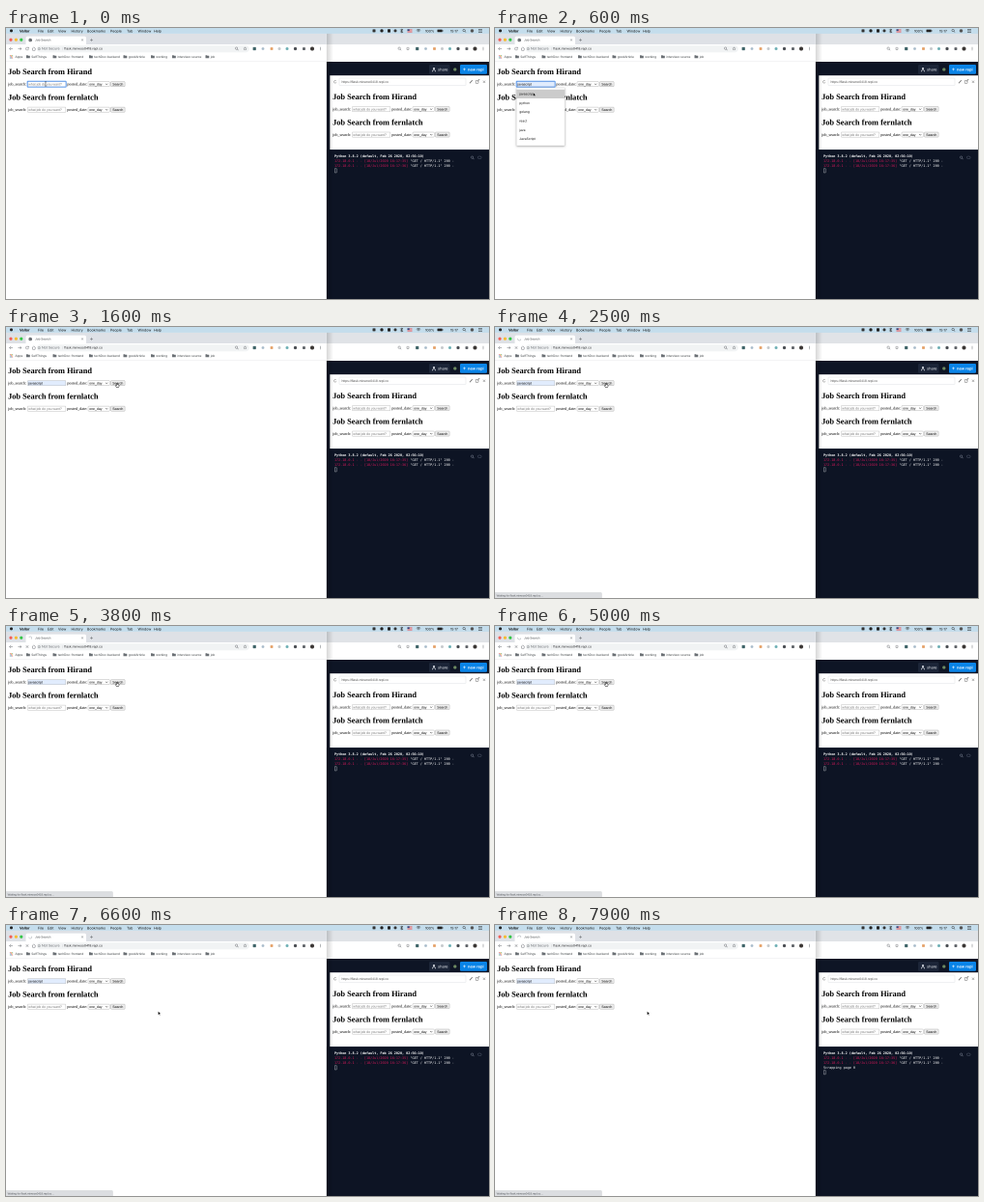
Recreate the animation shown at these times as an HTML page with a canvas. Size 500x281 px, loop 8000 ms.

```html
<!DOCTYPE html>
<html lang="en">
<head>
<meta charset="utf-8">
<title>Job Search</title>
<style>
html, body { margin: 0; width: 100%; height: 100%; overflow: hidden; background: #fff; }
canvas { display: block; width: 500px; height: 281px; }
</style>
</head>
<body>
<canvas id="stage" width="500" height="281"></canvas>
<script>
const W = 500, H = 281, LOOP = 8000;
const view = document.getElementById('stage').getContext('2d');
// The scene is drawn at double size and halved, which keeps tiny text even.
const big = document.createElement('canvas');
big.width = W * 2;
big.height = H * 2;
const ctx = big.getContext('2d');
ctx.textRendering = 'geometricPrecision';

const UI = 'Inter, Roboto, sans-serif';
const SANS = '"Liberation Sans", Arial, sans-serif';
const SERIF = '"Liberation Serif", "Times New Roman", serif';
const MONO = '"DejaVu Sans Mono", monospace';
const HOST = 'flask.minwoo0418.repl.co';

// Moments, in ms
const OPEN = 150, HOVER = 400, PICK = 900, LOAD = 2200, PRINT = 7400;
// Edges of the layout
const BAR = 5.8, PAGE = 35, SPLIT = 331.8, PANEL = 335.3, PANEL_TOP = 49.2, SHELL = 126.2;

function text(s, x, y, size, color = '#222', font = UI, weight = 400) {
  ctx.font = `${weight} ${size}px ${font}`;
  ctx.fillStyle = color;
  ctx.fillText(s, x, y);
}
function rect(x, y, w, h, color) {
  ctx.fillStyle = color;
  ctx.fillRect(x, y, w, h);
}
function box(x, y, w, h, r, fill, stroke, lw = 0.26) {
  ctx.beginPath();
  ctx.roundRect(x, y, w, h, r);
  if (fill) { ctx.fillStyle = fill; ctx.fill(); }
  if (stroke) { ctx.strokeStyle = stroke; ctx.lineWidth = lw; ctx.stroke(); }
}
function dot(x, y, r, color) {
  ctx.beginPath();
  ctx.arc(x, y, r, 0, 7);
  ctx.fillStyle = color;
  ctx.fill();
}
function ring(x, y, r, color, lw = 0.45, from = 0, to = Math.PI * 2) {
  ctx.beginPath();
  ctx.arc(x, y, r, from, to);
  ctx.strokeStyle = color;
  ctx.lineWidth = lw;
  ctx.stroke();
}
// Each path is a flat list: x, y, x, y ...
function line(color, lw, ...paths) {
  ctx.strokeStyle = color;
  ctx.lineWidth = lw;
  ctx.beginPath();
  for (const p of paths)
    for (let i = 0; i < p.length; i += 2) ctx[i ? 'lineTo' : 'moveTo'](p[i], p[i + 1]);
  ctx.stroke();
}
function cross(x, y, r, color, lw = 0.45) {
  line(color, lw, [x - r, y - r, x + r, y + r], [x - r, y + r, x + r, y - r]);
}
function plus(x, y, r, color, lw = 0.45) {
  line(color, lw, [x - r, y, x + r, y], [x, y - r, x, y + r]);
}
function lens(x, y, color) {
  ring(x - 0.4, y - 0.4, 1.2, color);
  line(color, 0.5, [x + 0.5, y + 0.5, x + 1.7, y + 1.7]);
}
function star(x, y, r, color) {
  ctx.beginPath();
  for (let i = 0; i < 10; i++) {
    const a = i * Math.PI / 5 - Math.PI / 2, d = i % 2 ? r * 0.45 : r;
    ctx.lineTo(x + d * Math.cos(a), y + d * Math.sin(a));
  }
  ctx.closePath();
  ctx.strokeStyle = color;
  ctx.lineWidth = 0.35;
  ctx.stroke();
}

function menuBar() {
  rect(0, 0, W, BAR, '#c4ddec');
  dot(5.5, 2.9, 1.5, '#222');
  text('Vellor', 14, 4.3, 3.7, '#111', UI, 700);
  const items = [['File', 33], ['Edit', 43], ['View', 54], ['History', 67.5], ['Bookmarks', 84],
    ['People', 108], ['Tab', 125], ['Window', 136.5], ['Help', 153]];
  for (const [s, x] of items) text(s, x, 4.3, 3.6, '#111');

  box(379.5, 1.4, 3, 3, 0.5, '#333');
  dot(389, 2.9, 1.6, '#222');
  box(395, 1.2, 3, 3.4, 0.6, '#222');
  dot(403, 2.9, 1.5, '#333');
  line('#222', 0.5, [408, 1.4, 411, 4.4, 409.5, 5, 409.5, 1, 411, 1.6, 408, 4.4]);
  rect(415.5, 1.3, 5, 3.4, '#fff');
  for (let i = 0; i < 4; i++) rect(415.5, 1.3 + i, 5, 0.5, '#c43b48');
  rect(415.5, 1.3, 2.2, 1.8, '#35477d');
  for (let i = 1; i < 4; i++) ring(427, 4.8, i * 1.1, '#222', 0.5, -2.3, -0.85);
  text('100%', 434, 4.3, 3.5, '#111');
  box(446.5, 1.6, 5.2, 2.7, 0.5, '#222');
  rect(452, 2.4, 0.5, 1.1, '#222');
  text('15:17', 460, 4.3, 3.5, '#111');
  lens(474.5, 2.9, '#222');
  dot(482.5, 2.9, 1.7, '#555');
  for (let i = 0; i < 3; i++) rect(489, 1.4 + i * 1.3, 4, 0.5, '#222');
}

function toolIcons(dx) {
  const y = 21.5, ink = '#5f6368';
  ctx.save();
  ctx.translate(dx, 0);
  lens(239, y, ink);
  star(247.5, y, 1.7, ink);
  box(255.6, y - 1.6, 3.2, 3.2, 0.5, '#3f6468');
  dot(266, y, 1.4, '#a9bccb');
  box(273.6, y - 1.4, 2.8, 2.8, 0.5, '#e5a167');
  dot(283, y, 1.5, '#c6cacd');
  dot(291, y, 1.5, '#6fb0b5');
  dot(299.5, y, 1.6, '#4a4e53');
  box(307, y - 1.4, 2.9, 2.9, 0.7, ink);
  dot(317, y, 2, '#3b3735');
  for (let i = -1; i < 2; i++) dot(325.5, y + i * 1.3, 0.42, ink);
  ctx.restore();
}

function heading(s, y) {
  text(s, 2.08, y, 8.33, '#000', SERIF, 700);
}
function form(y, value, focus) {
  text('job_search:', 2.08, y, 4.17, '#000', SERIF);
  if (focus) box(22.1, y - 4.3, 40.1, 6, 0.5, null, '#4d90e8', 0.85);
  box(22.5, y - 3.9, 39.3, 5.2, 0.2, value ? '#e1ecfd' : '#fff', focus ? '#3f7fd8' : '#8a8a8a');
  text(value || 'what job do you want?', 23.3, y - 0.1, 3.47, value ? '#000' : '#757575', SANS);
  text('posted_date:', 63.2, y, 4.17, '#000', SERIF);
  box(85, y - 3.9, 22.3, 5.1, 0.8, '#fff', '#767676');
  text('one_day', 86.2, y - 0.1, 3.47, '#000', SANS);
  line('#222', 0.5, [103, y - 1.8, 104.2, y - 0.7, 105.4, y - 1.8]);
  box(108.5, y - 3.9, 14.6, 5.1, 0.6, '#efefef', '#767676');
  text('Search', 110.3, y - 0.1, 3.47, '#000', SANS);
}
function page(value, focus) {
  heading('Job Search from Hirand', 48.2);
  form(59.5, value, focus);
  heading('Job Search from fernlatch', 74.5);
  form(86, value && '', false);
}

function terminal(t) {
  rect(SPLIT, SHELL, W - SPLIT, H - SHELL, '#0d1424');
  const left = 340, size = 3.43;
  text('Python 3.8.2 (default, Feb 26 2020, 02:56:10)', left, 134, size, '#fff', MONO, 700);
  for (let i = 0; i < 2; i++) {
    const y = 139 + i * 4.9;
    text(`172.18.0.1 - - [18/Jul/2020 16:17:3${5 + i}] `, left, y, size, '#d3195a', MONO);
    text('"GET / HTTP/1.1" 200 -', left + 78.5, y, size, '#fff', MONO);
  }
  let y = 148.8;
  if (t >= PRINT) {
    text('Scrapping page 0', left, y, size, '#fff', MONO);
    y += 4.9;
  }
  box(340.3, y - 3, 1.9, 4.2, 0, null, '#e4e7ea', 0.35);
  lens(483, 134.5, '#8e96a5');
  box(488.5, 133, 3.6, 2.6, 1.2, null, '#687082', 0.4);
}

function backWindow(t) {
  rect(SPLIT, BAR, W - SPLIT, 11.2, '#e0e3e7');
  rect(SPLIT, 17, W - SPLIT, PAGE - 17, '#fff');
  toolIcons(168.5);
  rect(SPLIT, PAGE, W - SPLIT, H - PAGE, '#0e1525');
  box(438, 38, 21.5, 9.8, 1.2, '#1c2538');
  dot(443, 42, 1, '#e9edf3');
  ring(443, 45.4, 1.7, '#e9edf3', 0.6, Math.PI, 0);
  text('share', 447, 44.3, 4, '#eef1f5');
  dot(464.8, 43, 1.6, '#6f8b62');
  box(470, 38, 28, 9.8, 1.2, '#0a84e8');
  plus(474.5, 42.9, 1.4, '#fff', 0.55);
  text('new repl', 478, 44.3, 4, '#fff', UI, 600);

  rect(PANEL, PANEL_TOP, W - PANEL, SHELL - PANEL_TOP, '#fff');
  ring(340.8, 55.8, 1.3, '#555', 0.45, 0.4, 5.6);
  box(345, 52, 131, 7.6, 0.7, '#fff', '#d3d6da', 0.35);
  text('https://' + HOST, 347.5, 56.9, 3.4, '#555', SANS);
  line('#555', 0.7, [480, 57.3, 482.8, 54.3]);
  box(486.2, 54.5, 2.8, 2.8, 0.3, null, '#555', 0.45);
  line('#555', 0.45, [488, 55.5, 490.3, 53.4, 488.8, 53.4]);
  cross(495, 55.8, 1.2, '#555');
  ctx.save();
  ctx.translate(336, 25.9);
  page('', false);
  ctx.restore();
  terminal(t);

  const shade = ctx.createLinearGradient(SPLIT, 0, SPLIT + 7, 0);
  shade.addColorStop(0, 'rgba(0,0,0,.16)');
  shade.addColorStop(1, 'rgba(0,0,0,0)');
  rect(SPLIT, BAR, 7, H - BAR, shade);
}

function bookmarks() {
  const colors = ['#d5493f', '#e8a53c', '#4a9a57', '#4a83d8'];
  for (let i = 0; i < 9; i++)
    rect(3.9 + i % 3 * 1.2, 28.3 + Math.floor(i / 3) * 1.2, 0.8, 0.8, colors[i % 4]);
  text('Apps', 9.5, 31.2, 3.2, '#3c4043');
  const items = [['SelfThings', 21], ['techDoc-frontend', 48.5], ['techDoc-backend', 86],
    ['goodArticle', 121.5], ['working', 150], ['interview-source', 172], ['job', 206.5]];
  for (const [s, x] of items) {
    box(x, 28.2, 1.8, 1.2, 0.3, '#6b7075');
    box(x, 28.7, 3.8, 2.6, 0.3, '#6b7075');
    text(s, x + 5.2, 31.2, 3.15, '#3c4043');
  }
}

function frontWindow(t, loading) {
  rect(0, BAR, SPLIT, H - BAR, '#fff');
  rect(0, BAR, SPLIT, 11.2, '#dee1e6');
  ['#f25f57', '#f6bc2f', '#35c648'].forEach((c, i) => dot(5 + i * 5.4, 12.2, 1.55, c));
  box(20.5, 8.6, 62.5, 8.6, [2, 2, 0, 0], '#fff');
  if (loading) {
    const a = t / 1000 * Math.PI * 2.4;
    ring(25.2, 12.5, 1.6, '#9aa0a6', 0.5, a, a + 3.6);
  } else {
    dot(25.2, 12.5, 1.8, '#5f6368');
    line('#c9ccd0', 0.35, [23.7, 12, 25, 12.8, 25.3, 13.8], [25.6, 11, 26.5, 12.2]);
  }
  text('Job Search', 30, 13.6, 3.05, '#3c4043');
  cross(79, 12.4, 1, '#5f6368', 0.4);
  plus(88.5, 12.4, 1.5, '#5f6368');

  const ink = '#5f6368';
  line(ink, 0.45, [3.5, 21.5, 7, 21.5], [5.1, 19.9, 3.5, 21.5, 5.1, 23.1]);
  line(ink, 0.45, [12.5, 21.5, 16, 21.5], [14.4, 19.9, 16, 21.5, 14.4, 23.1]);
  if (loading) cross(22, 21.5, 1.35, ink);
  else {
    ring(22, 21.5, 1.5, ink, 0.45, 0.2, 5.4);
    line(ink, 0.45, [23.6, 19.8, 23.6, 21, 22.4, 21]);
  }
  box(31.8, 18.2, 220, 7, 3.5, '#f1f3f4');
  line(ink, 0.45, [27, 21.6, 28.8, 19.8, 30.6, 21.6], [27.5, 21.3, 27.5, 23.2, 30.1, 23.2, 30.1, 21.3]);
  ring(34.3, 21.6, 1.2, ink, 0.35);
  line(ink, 0.4, [34.3, 21.4, 34.3, 22.3], [34.3, 20.8, 34.3, 21]);
  text('Not Secure', 37, 22.7, 3.5, ink);
  rect(58.1, 20.2, 0.25, 2.9, '#b5b9be');
  text(HOST, 60.3, 22.7, 3.3, '#202124');
  toolIcons(0);
  bookmarks();
  rect(0, PAGE - 0.3, SPLIT, 0.3, '#dadce0');

  page(t >= HOVER ? 'javascript' : '', t < 1450);
  if (t >= OPEN && t < PICK) suggestions(t >= HOVER);
  if (loading) {
    box(-1, 275.4, 111.5, 7, [0, 1, 0, 0], '#dcdee1', '#bfc2c6');
    text(`Waiting for ${HOST}...`, 1.6, 279.4, 2.8, '#4d5156', SANS);
  }
}

function suggestions(hot) {
  ctx.save();
  ctx.shadowColor = 'rgba(0,0,0,.35)';
  ctx.shadowBlur = 4;
  ctx.shadowOffsetY = 1.5;
  box(22.2, 62, 50, 60, 0.5, '#fff');
  ctx.restore();
  box(22.2, 62, 50, 60, 0.5, null, '#c8c8c8');
  if (hot) rect(22.3, 63.8, 49.8, 9.2, '#cbcbcb');
  ['javascript', 'python', 'golang', 'react', 'java', 'JavaScript'].forEach((s, i) =>
    text(s, 25.2, 69.6 + i * 9.3, 3.3, '#111'));
}

// Pointer stops: time, x, y
const stops = [[0, 41, 58], [250, 41, 58], [500, 39.5, 67], [950, 39.5, 67], [1450, 115, 58.5],
  [5500, 115, 58.5], [6100, 157.5, 89.5], [LOOP, 157.5, 89.5]];
function pointerAt(t) {
  const i = stops.findIndex(s => s[0] > t);
  const [t0, x0, y0] = stops[i - 1], [t1, x1, y1] = stops[i];
  const k = (t - t0) / (t1 - t0), e = k * k * (3 - 2 * k);
  return [x0 + (x1 - x0) * e, y0 + (y1 - y0) * e];
}
function outline(points, fill, stroke, lw) {
  ctx.beginPath();
  for (let i = 0; i < points.length; i += 2) ctx.lineTo(points[i], points[i + 1]);
  ctx.closePath();
  ctx.fillStyle = fill;
  ctx.fill();
  ctx.strokeStyle = stroke;
  ctx.lineWidth = lw;
  ctx.stroke();
}
function pointer(t) {
  const [x, y] = pointerAt(t);
  ctx.save();
  ctx.translate(x, y);
  if (x > 22 && x < 62 && y < 61.5)
    line('#222', 0.45, [0, -2, 0, 2], [-0.8, -2.1, 0.8, -2.1], [-0.8, 2.1, 0.8, 2.1]);
  else if (x > 108 && x < 123 && y < 61)
    outline([-0.5, 0, 0.4, 0, 0.5, 1.3, 2.1, 1.7, 2, 3.2, 1.5, 4, -0.6, 4, -1.7, 2.2, -0.5, 2.3],
      '#fff', '#111', 0.5);
  else
    outline([0, 0, 0, 3.7, 0.9, 2.9, 1.5, 4.2, 2.1, 3.9, 1.5, 2.7, 2.7, 2.6], '#000', '#fff', 0.25);
  ctx.restore();
}

function draw(t) {
  ctx.setTransform(2, 0, 0, 2, 0, 0);
  backWindow(t);
  frontWindow(t, t >= LOAD);
  menuBar();
  pointer(t);
  view.drawImage(big, 0, 0, W, H);
}

let start;
function tick(now) {
  start ??= now;
  draw((now - start) % LOOP);
  requestAnimationFrame(tick);
}
draw(0);
requestAnimationFrame(tick);
</script>
</body>
</html>
```
